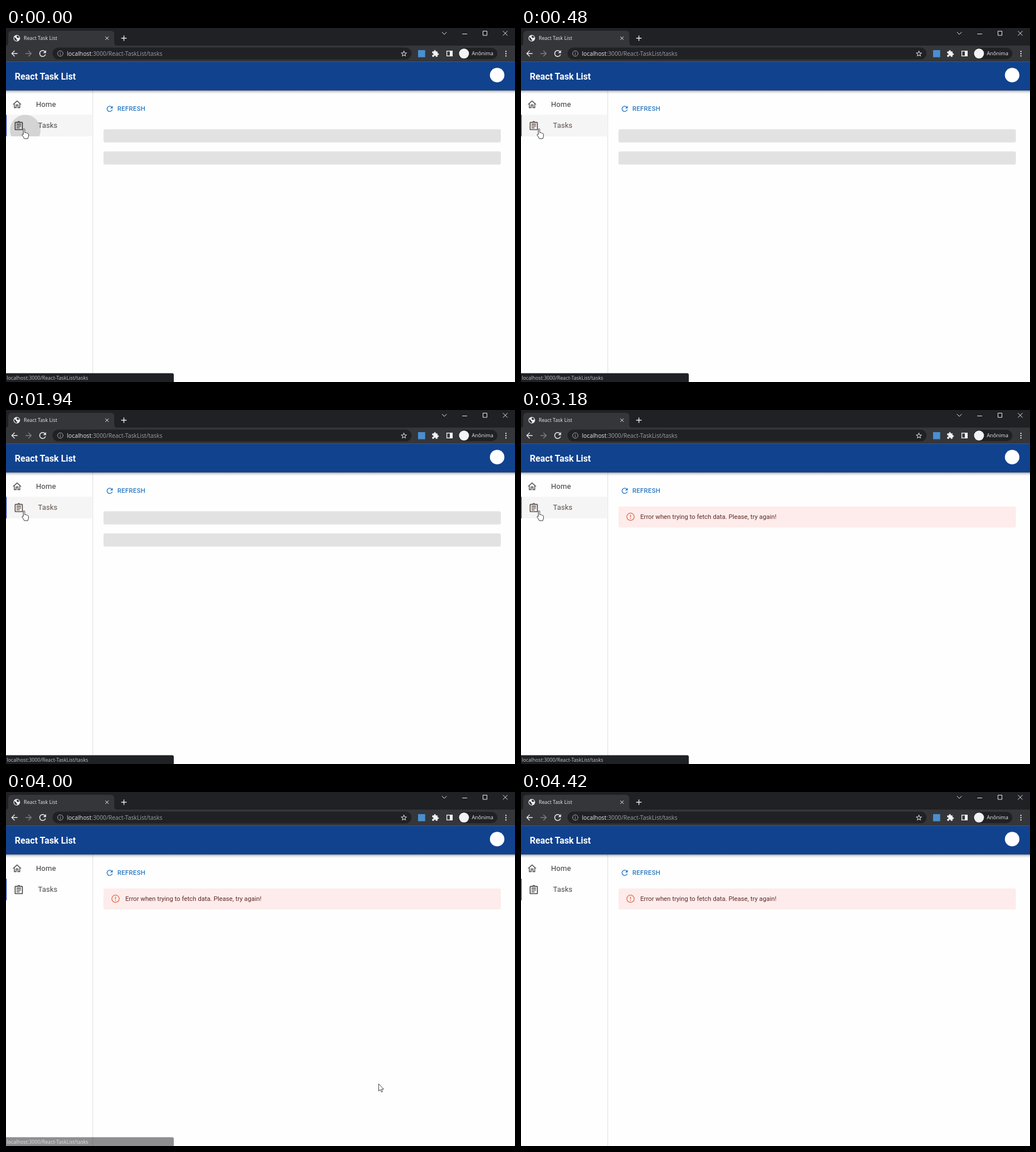
An HTML page for the animation above (5.08 s loop, 898 px wide and 624 px high).

```html
<!DOCTYPE html>
<html lang="en">
<head>
<meta charset="utf-8">
<title>React Task List</title>
<style>
  html, body { margin: 0; width: 100%; height: 100%; overflow: hidden; background: #fefefe; }
  svg { display: block; width: 100vw; height: 100vh; }
  text { font-family: Roboto, sans-serif; white-space: pre; }
  .ui text { font-family: "Open Sans", "Noto Sans", sans-serif; font-size: 8.8px; }
  .line { fill: none; stroke: #e8eaed; stroke-width: 1; }
</style>
</head>
<body>
<svg viewBox="0 0 898 624">
  <defs>
    <linearGradient id="shade" x2="0" y2="1">
      <stop stop-color="#000" stop-opacity=".42"/>
      <stop offset=".4" stop-color="#000" stop-opacity=".14"/>
      <stop offset="1" stop-color="#000" stop-opacity="0"/>
    </linearGradient>
    <clipPath id="rowClip"><rect x="1" y="153" width="152" height="38"/></clipPath>
  </defs>

  <!-- Page -->
  <rect width="898" height="624" fill="#fefefe"/>
  <rect x="152.5" y="110" width="1" height="514" fill="#dcdcdc"/>
  <rect id="row" y="153" width="152.5" height="38" fill="#f5f5f5"/>
  <rect y="153" width="1.2" height="38" fill="#3550c8"/>
  <g id="homeIcon"></g>
  <text x="53" y="138.8" font-size="12.8" letter-spacing=".2" fill="#33383c">Home</text>
  <g id="tasks">
    <g id="tasksIcon"></g>
    <text x="56.6" y="176.2" font-size="12.8" letter-spacing=".12">Tasks</text>
  </g>
  <g clip-path="url(#rowClip)"><circle id="ripple" cx="34" cy="180"/></g>

  <g id="refreshIcon"></g>
  <text x="196.4" y="146" font-size="11.2" font-weight="500" letter-spacing=".32" fill="#2a78c2">REFRESH</text>

  <g id="skeleton">
    <rect x="172" y="178.5" width="701" height="23.3" rx="3.2"/>
    <rect x="172" y="217.5" width="701" height="23.3" rx="3.2"/>
  </g>
  <g id="alert">
    <rect x="172" y="170" width="701" height="37.3" rx="3.2" fill="#fdeceb"/>
    <circle cx="193.2" cy="188.2" r="6.5" fill="none" stroke="#e0714f" stroke-width="1.3"/>
    <path d="M193.2 184.5v4.4m0 1.5v1.5" stroke="#e0714f" stroke-width="1.4"/>
    <text x="210.5" y="192" font-size="11.2" fill="#5f2a28">Error when trying to fetch data. Please, try again!</text>
  </g>

  <rect y="110" width="898" height="6" fill="url(#shade)"/>
  <rect y="60" width="898" height="50" fill="#11428e"/>
  <text x="15.4" y="90.6" font-size="15.8" font-weight="600" fill="#fff">React Task List</text>
  <circle cx="866.5" cy="83" r="12.8" fill="#fff"/>

  <!-- Browser window -->
  <g class="ui">
    <rect width="898" height="31" fill="#202124"/>
    <path d="M0 31q4 0 4-5V11q0-6 6-6h175q6 0 6 6v15q0 5 5 5z" fill="#35363a"/>
    <rect y="31" width="898" height="28.5" fill="#35363a"/>
    <rect y="59" width="898" height="1" fill="#4a5468"/>
    <rect x="82" y="34.5" width="633.5" height="21" rx="10.5" fill="#202124"/>
    <rect x="798" y="35" width="69" height="20" rx="10" fill="#202124"/>

    <circle cx="19" cy="18" r="5.8" fill="#f1f3f4"/>
    <path d="M14.2 16.2q3 .4 3.5 2.2t2 2q.4 1.6-1.3 2.3-4-1-4.2-6.5zM19 13.4q3.4 0 4.6 3l-2.8 1.4q-2.2-.6-2-2.2z" fill="#35363a"/>
    <text x="31.2" y="21" fill="#e8eaed">React Task List</text>
    <path class="line" d="M175.3 15.1l5.8 5.8m0-5.8l-5.8 5.8" stroke-width="1.2"/>
    <path class="line" d="M203.3 18h9.4M208 13.3v9.4" style="stroke-width:1.4"/>
    <path class="line" d="M769.2 7.2l4.1 4.1 4.1-4.1M805 10.5h8.5M841.5 5.5h7v7.5h-7zM876.8 5.4l8 8m0-8l-8 8"/>

    <g id="toolbarIcons"></g>
    <circle cx="95.8" cy="45" r="4.8" class="line" style="stroke:#a5a9ae"/>
    <path d="M95.8 42.2v1.2m0 1v3.4" class="line" style="stroke:#a5a9ae"/>
    <text x="107.5" y="48.8" style="font-size:10.3px" fill="#9aa0a6"><tspan fill="#e8eaed">localhost</tspan>:3000/React-TaskList/tasks</text>
    <rect x="727" y="39" width="12.5" height="12.5" fill="#4a8fd0"/>
    <rect x="777.7" y="40.7" width="9.6" height="8.6" class="line" style="stroke-width:1.4"/>
    <rect x="783" y="40" width="5" height="10" fill="#f1f3f4"/>
    <circle cx="808" cy="45" r="8.8" fill="#f1f3f4"/>
    <text x="821.7" y="48.2" style="font-size:9.05px" fill="#e8eaed">Anônima</text>
    <path d="M882 40.2v2m0 2v2m0 2v2" stroke="#e8eaed" stroke-width="2"/>

    <g id="status">
      <path d="M0 608.5h293q3 0 3 3V624H0z" fill="#202124"/>
      <text x="1.2" y="619.8" fill="#c4c7cb">localhost:3000/React-TaskList/tasks</text>
    </g>
  </g>

  <g id="cursor" fill="#fff" stroke="#333" stroke-linejoin="round">
    <path id="hand" transform="translate(-4 -.5)" d="M2.5 1.2C2.5-.2 5-.2 5 1.2V7l1-.2c1 0 1.5.4 1.7.8 1-.3 1.8.1 2 .8 1.2-.2 2 .3 2 1.4V13c0 1.8-1 2.6-1.2 4.5H4.3C3.5 15.5 1.5 13 .6 11.4c-.8-1.4.6-2.4 1.9-1.1z"/>
    <path id="arrow" stroke-width=".9" d="M0 0V12.6l2.9-2.5 2 4.4 2-.9-2-4.2h4z"/>
  </g>
</svg>
<script>
const $ = id => document.getElementById(id);

// Each icon path lives in a 24-unit box centred on (cx, cy).
function addIcon(parent, path, cx, cy, scale, fill) {
  const color = fill ? ` fill="${fill}"` : '';
  $(parent).insertAdjacentHTML('beforeend',
    `<path transform="translate(${cx} ${cy}) scale(${scale}) translate(-12 -12)" fill-rule="evenodd"${color} d="${path}"/>`);
}

const BACK = 'M20 11H7.83l5.59-5.59L12 4l-8 8 8 8 1.41-1.41L7.83 13H20v-2z';
const REFRESH = 'M17.65 6.35C16.2 4.9 14.21 4 12 4c-4.42 0-7.99 3.58-7.99 8s3.57 8 7.99 8c3.73 0 6.84-2.55 7.73-6h-2.08c-.82 2.33-3.04 4-5.65 4-3.31 0-6-2.69-6-6s2.69-6 6-6c1.66 0 3.14.69 4.22 1.78L13 11h7V4l-2.35 2.35z';
const STAR = 'M22 9.24l-7.19-.62L12 2 9.19 8.63 2 9.24l5.46 4.73L5.82 21 12 17.27 18.18 21l-1.63-7.03L22 9.24zM12 15.4l-3.76 2.27 1-4.28-3.32-2.88 4.38-.38L12 6.1l1.71 4.04 4.38.38-3.32 2.88 1 4.28L12 15.4z';
const PUZZLE = 'M20.5 11H19V7c0-1.1-.9-2-2-2h-4V3.5a2.5 2.5 0 0 0-5 0V5H4c-1.1 0-2 .9-2 2v3.8h1.5a2.7 2.7 0 0 1 0 5.4H2V20c0 1.1.9 2 2 2h3.8v-1.5a2.7 2.7 0 0 1 5.4 0V22H17c1.1 0 2-.9 2-2v-4h1.5a2.5 2.5 0 0 0 0-5z';
const HOME = 'M12 5.69l5 4.5V18h-2v-6H9v6H7v-7.81l5-4.5M12 3L2 12h3v8h6v-6h2v6h6v-8h3L12 3z';
const CLIPBOARD = 'M7 15h7v2H7zm0-4h10v2H7zm0-4h10v2H7zm12-4h-4.18C14.4 1.84 13.3 1 12 1s-2.4.84-2.82 2H5c-1.1 0-2 .9-2 2v14c0 1.1.9 2 2 2h14c1.1 0 2-.9 2-2V5c0-1.1-.9-2-2-2zm-7-.25a.75.75 0 0 1 0 1.5.75.75 0 0 1 0-1.5zM19 19H5V5h14z';

addIcon('toolbarIcons', BACK, 14.8, 45, .7, '#e8eaed');
addIcon('toolbarIcons', 'M4 11h12.17l-5.59-5.59L12 4l8 8-8 8-1.41-1.41L16.17 13H4z', 40, 45, .7, '#7d7f83');
addIcon('toolbarIcons', REFRESH, 64.7, 45, .74, '#e8eaed');
addIcon('toolbarIcons', STAR, 702, 45.2, .56, '#e0e2e5');
addIcon('toolbarIcons', PUZZLE, 757.5, 45.2, .56, '#f1f3f4');
addIcon('homeIcon', HOME, 19.5, 134.8, .8, '#5c5c5c');
addIcon('tasksIcon', CLIPBOARD, 22.5, 172.8, .8);
addIcon('refreshIcon', REFRESH, 183, 142.5, .667, '#2a78c2');

const LOOP = 5080, STEP = 70, MOVE_START = 3580, EXIT = 4420;
const rippleSteps = [[27, .135], [62, .105], [90, .07], [109, .035]];
// Pointer positions, one per step from MOVE_START.
const trail = [[36, 181], [72, 197], [170, 250], [330, 332], [510, 424], [637, 490],
  [657.5, 514.5], [690, 538.5], [727, 558], [767, 577], [806, 594], [837, 611]];

const show = (id, visible) => $(id).style.display = visible ? '' : 'none';

function draw(t) {
  const [radius, alpha] = rippleSteps[t < 60 ? 0 : 1 + Math.floor((t - 60) / STEP)] || [0, 0];
  $('ripple').setAttribute('r', radius);
  $('ripple').setAttribute('fill-opacity', alpha);

  const moveStep = Math.floor((t - MOVE_START) / STEP);
  const hovering = moveStep < 2;
  show('row', hovering);
  $('tasks').setAttribute('fill', t >= 410 && hovering ? '#60504b' : '#484848');

  show('skeleton', t < 3180);
  show('alert', t >= 3180);
  $('skeleton').setAttribute('fill', t >= 1160 && t < 1940 ? '#f3f3f3' : '#e2e2e2');

  const stepTime = MOVE_START + moveStep * STEP;
  $('status').setAttribute('opacity', Math.min(1, Math.max(0, (4100 - stepTime) / 200)));

  const [x, y] = moveStep < 0 ? [32, 178] : trail[Math.min(moveStep, trail.length - 1)];
  $('cursor').setAttribute('transform', `translate(${x} ${y})`);
  show('cursor', t < EXIT);
  show('hand', hovering);
  show('arrow', !hovering);
}

const start = performance.now();
function tick() {
  draw((performance.now() - start) % LOOP);
  requestAnimationFrame(tick);
}
tick();
</script>
</body>
</html>
```
